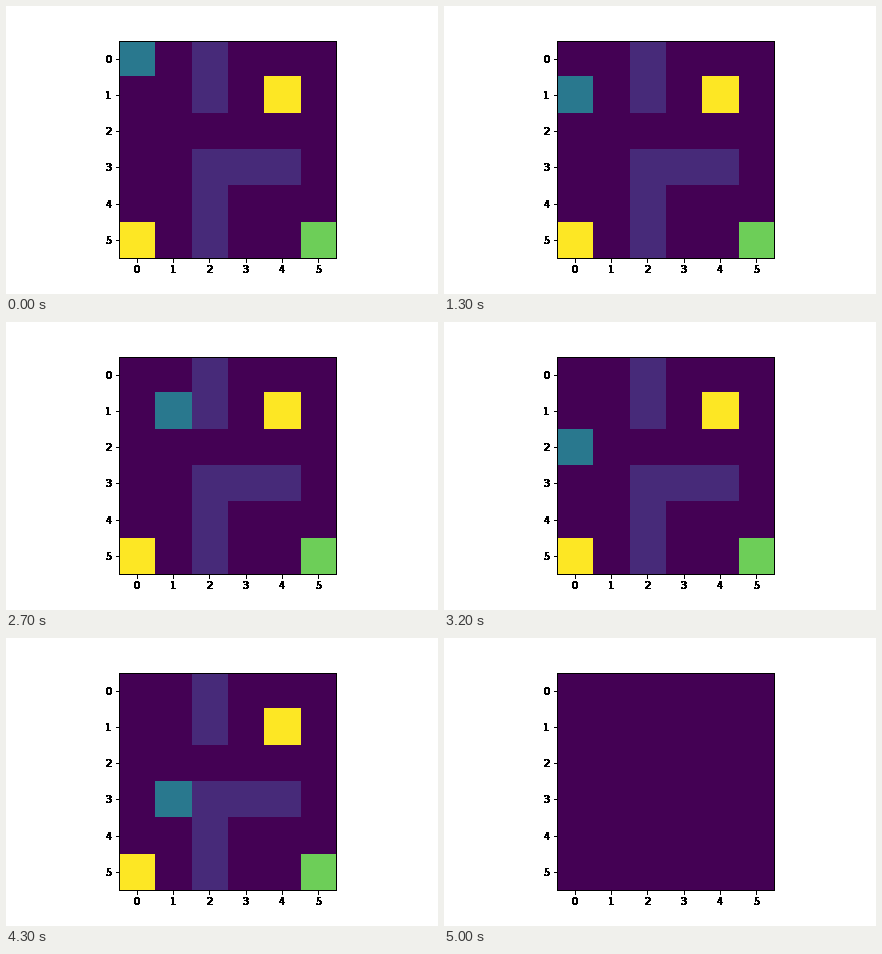
A matplotlib script that plays this animation: 432 px wide and 288 px high, repeating every 5500 ms.

```python
import numpy as np
import matplotlib.pyplot as plt
from matplotlib.animation import FuncAnimation

STEP_MS = 100
FRAMES = 55
WALL, AGENT, GOAL, PRIZE = 0.12, 0.4, 0.78, 1.0

# One letter per step: a move, or a dot for standing still.
MOVES = "..R....DLU" ".RDL.URD.L" "UR..LR.DUL" "D.DD.RDL.." "R..ULU.RDL"
SHIFT = {"U": (-1, 0), "D": (1, 0), "L": (0, -1), "R": (0, 1), ".": (0, 0)}


def make_maze():
    maze = np.zeros((6, 6))
    maze[:2, 2] = WALL
    maze[3:, 2] = WALL
    maze[3, 2:5] = WALL
    maze[5, 0] = maze[1, 4] = PRIZE
    maze[5, 5] = GOAL
    return maze


def solid_black(img, dpi):
    """Turn every touched pixel fully black, without soft edges."""
    out = np.zeros_like(img)
    out[..., 3] = img[..., 3] > 0
    return out, 0, 0


MAZE = make_maze()
PATH = np.cumsum([SHIFT[m] for m in MOVES], axis=0)

fig, ax = plt.subplots(figsize=(6, 4), dpi=72, facecolor="white")
fig.subplots_adjust(left=0.125, right=0.9, bottom=0.125, top=0.88)
board = ax.imshow(MAZE, cmap="viridis", vmin=0, vmax=1, interpolation="nearest")
ax.set_xticks(range(6))
ax.set_yticks(range(6))
for part in (ax.xaxis, ax.yaxis, *ax.spines.values()):
    part.set_agg_filter(solid_black)


def update(step):
    if step < len(PATH):
        grid = MAZE.copy()
        grid[tuple(PATH[step])] = AGENT
    else:
        grid = np.zeros_like(MAZE)
    board.set_data(grid)
    return (board,)


anim = FuncAnimation(fig, update, frames=FRAMES, interval=STEP_MS,
                     repeat=True, repeat_delay=0, blit=False)
plt.show()
```
